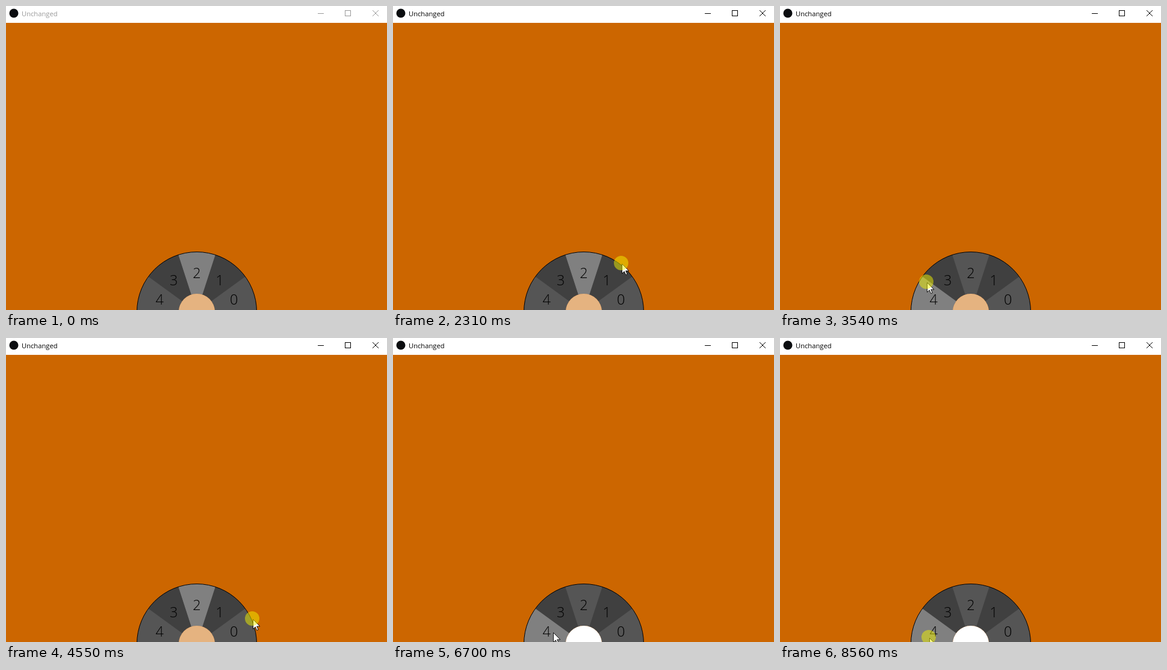
Recreate the animation shown at these times as an HTML page with a canvas. Size 633 px wide and 505 px high, loop 8630 ms.

```html
<!DOCTYPE html>
<html lang="en">
<head>
<meta charset="utf-8">
<title>Pie menu</title>
<style>
  html, body { margin: 0; width: 100%; height: 100%; overflow: hidden; background: #c60; }
  canvas { display: block; }
</style>
</head>
<body>
<canvas id="stage" width="633" height="505"></canvas>
<script>
const ctx = document.getElementById('stage').getContext('2d');
const LOOP = 8630, ENTER = 70, FOCUS = 820, TAP = 45;
const CX = 317, CY = 508, OUTER = 100, INNER = 30;
const COUNT = 5, SLICE = Math.PI / COUNT, DEFAULT = 2;
const ORANGE = '#c60';

// Pointer stops around the wheel: time, angle in slices, radius
const stops = [
  [ENTER, 2.24, 93], [590, 1.13, 95], [1140, 1.13, 94], // enter, focus the window
  [1440, 1.16, 78], [1620, 1.61, 153],                  // drag out of the wheel
  [1920, 1.45, 97], [2310, 1.46, 102], [2500, 1, 108],  // hover along the rim
  [2900, 0.65, 92], [3220, 2.1, 104], [3540, 4.05, 89], // over the top to the left
  [3930, 4.43, 68], [4200, 2.5, 73], [4600, 0.43, 105], // back through the slices
  [5060, 0.5, 73], [5480, 1.78, 69], [5640, 1.78, 69],
  [6660, 4.42, 55.7], [6850, 4.42, 55.7],               // tap slices in turn
  [7550, 3.59, 188], [7860, 3.45, 428], [8010, 3.45, 428],
  [8350, 4.3, 110], [8560, 4.75, 71]                    // far away and back
];

const taps = [5060];
for (let i = 0; i < 4; i++) taps.push(5640 + 337 * i);
const presses = [[1140, 4640], ...taps.map(t => [t, t + TAP]), [6850, LOOP]];

function pointerAt(t) {
  const next = stops.findIndex(s => s[0] > t);
  const b = stops[next < 0 ? stops.length - 1 : next];
  const a = next < 0 ? b : stops[Math.max(0, next - 1)];
  const k = a === b ? 0 : (t - a[0]) / (b[0] - a[0]);
  const angle = (a[1] + (b[1] - a[1]) * k) * SLICE;
  const r = a[2] + (b[2] - a[2]) * k;
  return [Math.round(CX + r * Math.cos(angle)), Math.round(CY - r * Math.sin(angle))];
}

function sliceAt([x, y]) {
  const dx = x - CX, dy = CY - y, r = Math.hypot(dx, dy);
  return r < INNER || r > OUTER ? DEFAULT : Math.floor(Math.atan2(dy, dx) / SLICE);
}

// A press lights the slice under the pointer; its release stores that slice
function stateAt(t) {
  const s = { lit: DEFAULT, value: DEFAULT, down: t >= FOCUS && t < FOCUS + 170 };
  for (const [start, end] of presses) {
    if (t < start) break;
    s.lit = sliceAt(pointerAt(Math.min(t, end)));
    if (t < end) s.down = true;
    else s.value = s.lit;
  }
  return s;
}

function disc(x, y, r, fill) {
  ctx.fillStyle = fill;
  ctx.beginPath();
  ctx.arc(x, y, r, 0, Math.PI * 2);
  ctx.fill();
}

function drawTitleBar(ink) {
  ctx.fillStyle = '#fff';
  ctx.fillRect(0, 0, 633, 28);
  disc(13, 12, 7.5, '#0b0d10');
  ctx.fillStyle = ctx.strokeStyle = ink;
  ctx.font = '11.2px "Open Sans", sans-serif';
  ctx.textAlign = 'left';
  ctx.fillText('Unchanged', 26, 17);
  ctx.fillRect(518, 12, 10, 1);
  ctx.lineWidth = 1;
  ctx.strokeRect(563.5, 7.5, 9, 9);
  ctx.stroke(new Path2D('M609 7L619 17M619 7L609 17'));
}

function drawWheel({ lit, value }) {
  disc(CX, CY, OUTER - 0.5, '#555');
  for (let i = 0; i < COUNT; i++) {
    if (i !== lit && i % 2 === 0) continue;
    ctx.fillStyle = i === lit ? '#808080' : '#404040';
    ctx.beginPath();
    ctx.moveTo(CX, CY);
    ctx.arc(CX, CY, OUTER - 0.5, -i * SLICE, -(i + 1) * SLICE, true);
    ctx.fill();
  }
  disc(CX, CY, INNER, ORANGE);
  disc(CX, CY, INNER, `rgba(255,255,255,${value / (COUNT - 1)})`);

  ctx.strokeStyle = '#000';
  ctx.lineWidth = 1;
  ctx.beginPath();
  ctx.arc(CX, CY, OUTER - 0.5, Math.PI, 0);
  ctx.stroke();

  ctx.fillStyle = '#000';
  ctx.font = '300 23.5px "Open Sans", "Noto Sans", sans-serif';
  ctx.textAlign = 'center';
  for (let i = 0; i < COUNT; i++) {
    const a = (i + 0.5) * SLICE;
    ctx.fillText(i, CX + 65 * Math.cos(a), CY - 65 * Math.sin(a) + 8.5);
  }
}

const arrow = new Path2D('M.5 .5V16.5L4.2 12.9L6.8 18.6L9.2 17.5L6.7 12H11.9Z');

function drawPointer([x, y], down) {
  ctx.save();
  ctx.translate(x + 1, y + 1);
  ctx.fillStyle = '#fff';
  ctx.fill(arrow);
  ctx.strokeStyle = '#000';
  ctx.lineWidth = 0.9;
  ctx.stroke(arrow);
  ctx.restore();
  if (down) disc(x, y, 12, 'rgba(242,242,0,.5)');
}

function draw(t) {
  const state = stateAt(t);
  ctx.fillStyle = ORANGE;
  ctx.fillRect(0, 0, 633, 505);
  drawWheel(state);
  drawTitleBar(t < FOCUS ? '#999' : '#000');
  if (t >= ENTER) drawPointer(pointerAt(t), state.down);
}

const begin = performance.now();
function tick() {
  draw((performance.now() - begin) % LOOP);
  requestAnimationFrame(tick);
}
tick();
</script>
</body>
</html>
```
